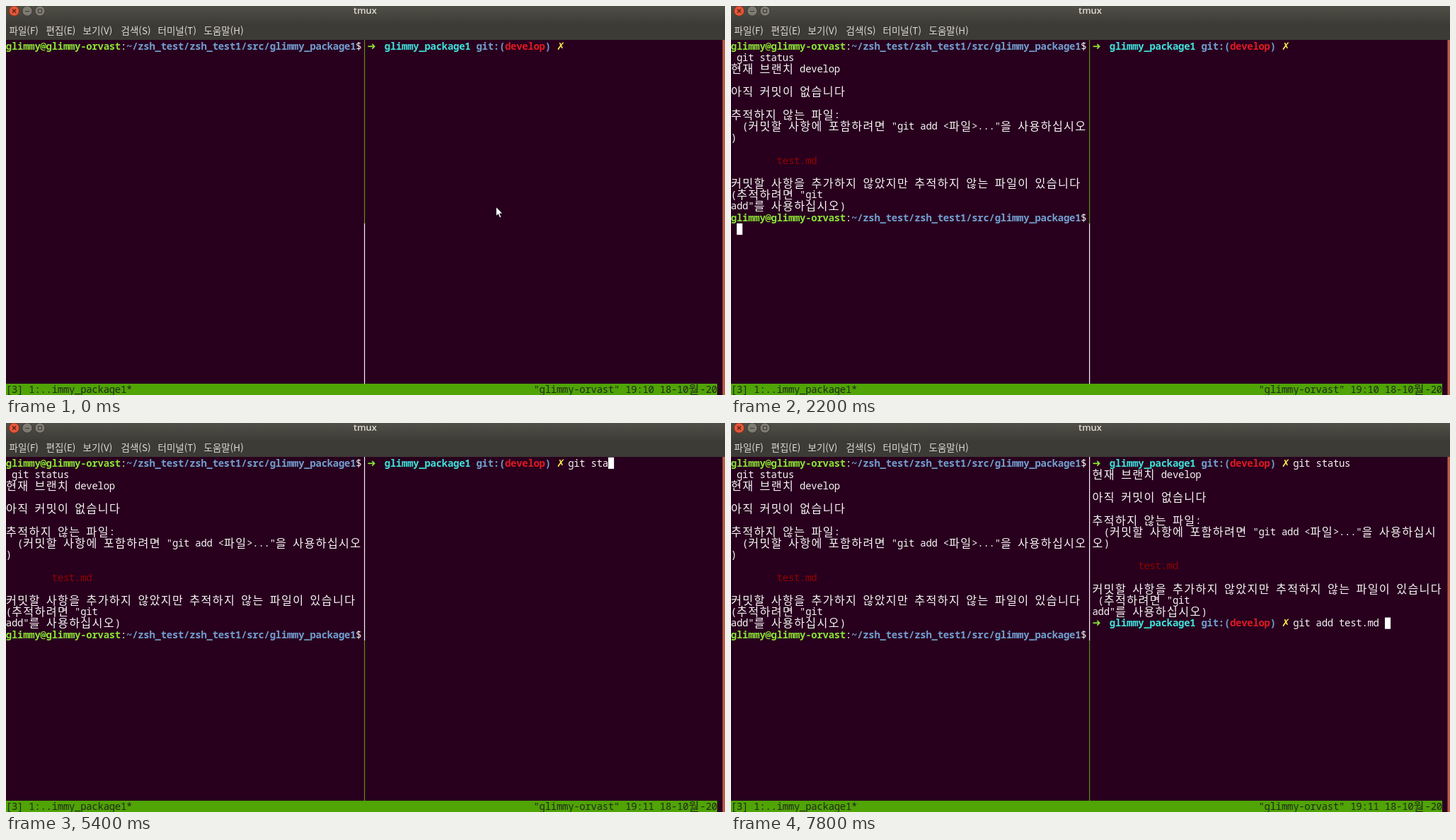
An HTML page with a canvas for the animation above (8000 ms loop, 1016 by 551 pixels).

```html
<!DOCTYPE html>
<html lang="ko">
<head>
<meta charset="utf-8">
<title>tmux</title>
<style>
html, body { margin: 0; width: 100%; height: 100%; overflow: hidden; background: #28001e; }
canvas { display: block; }
</style>
</head>
<body>
<canvas id="stage" width="1016" height="551"></canvas>
<script>
const ctx = document.getElementById('stage').getContext('2d');
const LOOP = 8000, CELL_W = 8.105, CELL_H = 16.2, TOP = 48.7, RIGHT = 63;
const MONO = '14px "Noto Sans Mono", "DejaVu Sans Mono", monospace';
const HANGUL = '16.2px "Noto Sans CJK KR", "Noto Sans CJK", sans-serif';
const MENU = '13.5px "Noto Sans CJK KR", "Noto Sans CJK", sans-serif';
const SYMBOL = 'bold 14.5px "DejaVu Sans", sans-serif';
const BG = '#28001e', WHITE = '#f6f4f4', GREEN = '#8ae234', BLUE = '#729fcf',
  CYAN = '#3fe3dc', RED = '#de1a22', DARK_RED = '#960000', YELLOW = '#f7e84a', BAR = '#50a406';
const USER = 'glimmy', HOST = 'glimmy-orvast', PACKAGE = 'glimmy_package1';

// Times at which each character appears
const STATUS_LEFT = [700, 800, 900, 1000, 1200, 1300, 1400, 1500, 1700, 1900];
const STATUS_RIGHT = [4100, 4200, 4500, 5000, 5200, 5300, 5400, 5500, 5600, 5700];
const ADD_RIGHT = [6300, 6400, 6500, 6600, 6700, 7000, 7000, 7200, 7300, 7400, 7500,
  7800, 7800, 7800, 7800, 7800];
const CURSOR_OFF = [[0, 400], [2900, 3000], [3900, 4100]];

function rect(x, y, w, h, color) {
  ctx.fillStyle = color;
  ctx.fillRect(x, y, w, h);
}

// Writes on the character grid and returns the next free column
function write(col, row, text, color = WHITE, bold = false) {
  const y = Math.round(TOP + row * CELL_H + 12.9);
  ctx.fillStyle = color;
  for (const ch of text) {
    const x = col * CELL_W, wide = ch >= '가' && ch <= '힣';
    if (wide || '➜✗'.includes(ch)) {
      ctx.font = wide ? HANGUL : SYMBOL;
      ctx.textAlign = 'left';
      ctx.fillText(ch, x, wide ? y + 1 : y);
    } else {
      ctx.font = (bold ? 'bold ' : '') + MONO;
      ctx.textAlign = 'center';
      ctx.fillText(ch, x + CELL_W / 2, y);
    }
    col += wide ? 2 : 1;
  }
  return col;
}

function runs(col, row, parts) {
  for (const [text, color, bold] of parts) col = write(col, row, text, color, bold);
}

function leftPrompt(row) {
  runs(0, row, [[USER + '@' + HOST, GREEN, true], [':'],
    ['~/zsh_test/zsh_test1/src/' + PACKAGE, BLUE, true], ['$']]);
}

function rightPrompt(row) {
  runs(RIGHT, row, [['➜  ', GREEN, true], [PACKAGE + ' ', CYAN, true], ['git:(', BLUE, true],
    ['develop', RED, true], [') ', BLUE, true], ['✗', YELLOW]]);
}

function gitStatus(col, row, wrapped, trailing, indent) {
  const lines = ['현재 브랜치 develop', '', '아직 커밋이 없습니다', '', '추적하지 않는 파일:',
    '  (커밋할 사항에 포함하려면 "git add <파일>..."을 사용하십시' + wrapped, trailing, '', '', '',
    '커밋할 사항을 추가하지 않았지만 추적하지 않는 파일이 있습니다',
    indent + '(추적하려면 "git', 'add"를 사용하십시오)'];
  lines.forEach((line, i) => write(col, row + i, line));
  write(col + 8, row + 8, 'test.md', DARK_RED);
}

function type(col, row, text, times, t) {
  const shown = text.slice(0, times.filter(time => time <= t).length);
  return [write(col, row, shown), row];
}

function windowButton(x, color, rim) {
  ctx.beginPath();
  ctx.arc(x, 7, 7.2, 0, 7);
  ctx.fillStyle = color;
  ctx.fill();
  ctx.strokeStyle = rim;
  ctx.lineWidth = 1;
  ctx.stroke();
}

function stroke(path, color, width = 1) {
  ctx.strokeStyle = color;
  ctx.lineWidth = width;
  ctx.stroke(new Path2D(path));
}

function drawWindow() {
  rect(0, 0, 1016, 551, BG);
  const shade = ctx.createLinearGradient(0, 0, 0, 26);
  shade.addColorStop(0, '#504f47');
  shade.addColorStop(1, '#3c3b36');
  rect(0, 0, 1016, 48, shade);
  windowButton(11.5, '#e4573a', '#7c2f1d');
  windowButton(30, '#7d7b71', '#35342f');
  windowButton(48, '#7d7b71', '#35342f');
  stroke('M9 4.5l5 5m0-5l-5 5', '#5b1d10', 1.3);
  stroke('M27 7.5h6M45.5 4.5h5v5h-5z', '#383731');

  ctx.fillStyle = '#dfdbd2';
  ctx.textAlign = 'center';
  ctx.font = '600 13px "Open Sans", "Noto Sans", sans-serif';
  ctx.fillText('tmux', 507.5, 11);
  ctx.textAlign = 'left';
  ctx.font = MENU;
  const menu = { '파일(F)': 4.5, '편집(E)': 56.5, '보기(V)': 108.5, '검색(S)': 162.5, '터미널(T)': 214.5, '도움말(H)': 279.5 };
  for (const label in menu) ctx.fillText(label, menu[label], 40);
  rect(1012.5, 48, 3.5, 503, '#bd5c48');
}

function drawStatusBar(t) {
  rect(0, 535, 1005, 16, BAR);
  const ink = '#20291b';
  write(0, 30, '[3] 1:..' + PACKAGE.slice(2) + '*', ink);
  write(92, 30, `"${HOST}" 19:1${t < 2400 ? 0 : 1} 18-10월-20`, ink);
}

function drawPointer(t) {
  if (t < 100) {
    const arrow = new Path2D('M692.5 284.5v13l3-2.6 2.2 5 2.2-1-2.2-4.8h4z');
    ctx.fillStyle = '#fff';
    ctx.fill(arrow);
    ctx.strokeStyle = '#100810';
    ctx.lineWidth = 0.8;
    ctx.stroke(arrow);
  } else if (t < 700) {
    stroke('M692 278.5h2l1 1 1-1h2M695 279.5v12M692 292.5h2l1-1 1 1h2', '#e8e4e6');
  }
}

function draw(t) {
  const rightActive = t >= 3400;
  drawWindow();
  rect(506, 48, 1.2, 260, rightActive ? WHITE : '#5c8f10');
  rect(506, 308, 1.2, 227, rightActive ? '#5c8f10' : WHITE);
  drawStatusBar(t);

  leftPrompt(0);
  rightPrompt(0);
  let cursor = type(1, 1, 'git status', STATUS_LEFT, t);
  if (t >= 2200) {
    gitStatus(0, 2, '오', ')', '');
    leftPrompt(15);
    cursor = [1, 16];
  }
  if (rightActive) cursor = type(98, 0, 'git status', STATUS_RIGHT, t);
  if (t >= 6000) {
    gitStatus(RIGHT, 1, '', '오)', ' ');
    rightPrompt(14);
    cursor = type(98, 14, 'git add test.md ', ADD_RIGHT, t);
  }
  if (!CURSOR_OFF.some(([from, to]) => t >= from && t < to)) {
    const [col, row] = cursor;
    rect(col * CELL_W, TOP + row * CELL_H, CELL_W, CELL_H, '#fff');
  }
  drawPointer(t);
}

const start = performance.now();
function tick() {
  draw((performance.now() - start) % LOOP);
  requestAnimationFrame(tick);
}
tick();
</script>
</body>
</html>
```
